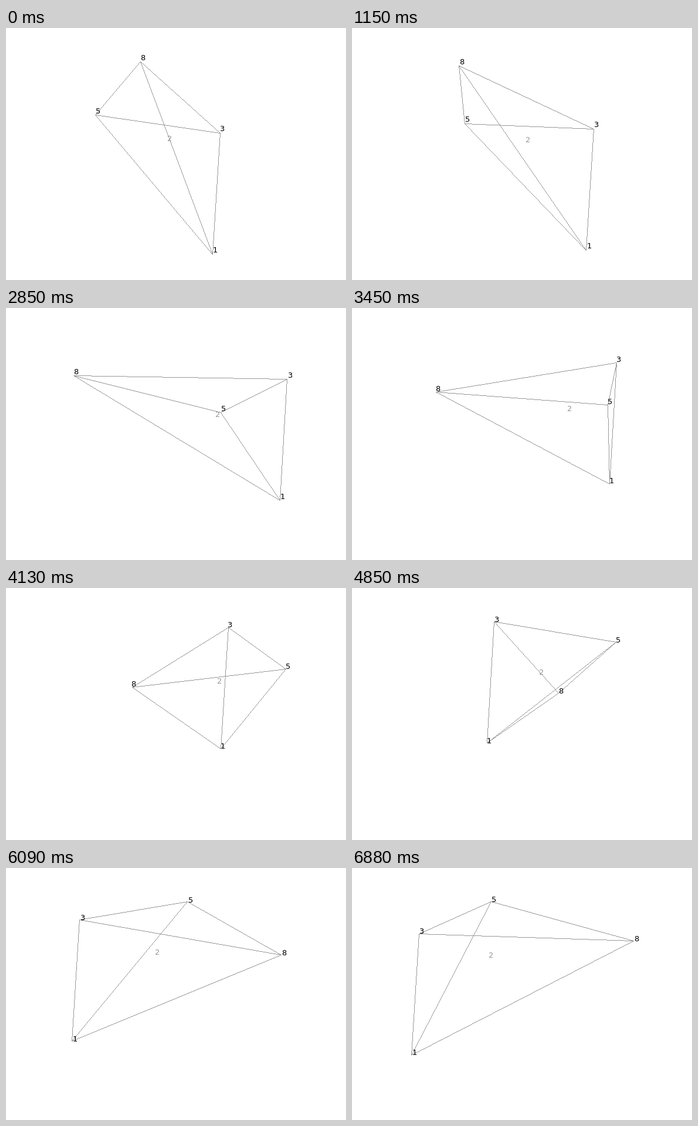
Animation of 580 by 430 pixels, one loop 8000 ms. Source, as an HTML page with a canvas:

```html
<!DOCTYPE html>
<html lang="en">
<head>
<meta charset="utf-8">
<title>Rotating tetrahedron</title>
<style>
  html, body { margin: 0; width: 100%; height: 100%; overflow: hidden; background: #fff; }
  canvas, svg { position: absolute; left: 0; top: 0; width: 580px; height: 430px; }
  text { font: 13px "DejaVu Sans", sans-serif; fill: #000; }
  text.inner { fill: #999; }
</style>
</head>
<body>
<canvas id="wire" width="580" height="430"></canvas>
<svg id="tags" viewBox="0 0 580 430"></svg>
<script>
const LOOP = 8000, START = 500, END = 6880, STEP = 40;
const CENTER = [297.5, 118.5];   // middle of the circle that carries 3, 5 and 8
const RADIUS = 183.4, DEPTH = 61.3, SLANT = 9.6;
const AXIS = [-12.5, 207];       // edge from 3 to 1, parallel to the axis
const FIRST_ANGLE = 68.4;
const APEX_ANGLE = 2 * Math.atan2(3, 4) * 180 / Math.PI;
const EDGES = ["85", "83", "81", "53", "51", "31"];

// the hand-turned motion: time in ms, degrees turned, with one rest
const TURN = [
  [450, 0], [2050, 40.2], [2850, 74.1], [4130, 131.9],
  [5250, 200.2], [5610, 200.2], [6090, 228.4], [6880, 251.3]
];

const pen = document.getElementById("wire").getContext("2d");
pen.fillStyle = "#999";

function addLabel(name, className = "") {
  const el = document.createElementNS("http://www.w3.org/2000/svg", "text");
  el.setAttribute("class", className);
  el.textContent = name;
  return document.getElementById("tags").appendChild(el);
}
const inner = addLabel("2", "inner");
const labels = ["8", "5", "3", "1"].map(name => ({ name, el: addLabel(name) }));

const cos = degrees => Math.cos(degrees * Math.PI / 180);
const sin = degrees => Math.sin(degrees * Math.PI / 180);

function turnAt(time) {
  const i = TURN.findIndex(key => time <= key[0]);
  if (i === 0) return 0;
  const [t0, d0] = TURN[i - 1], [t1, d1] = TURN[i];
  return d0 + (d1 - d0) * (time - t0) / (t1 - t0);
}

function onCircle(angle) {
  return [
    CENTER[0] + RADIUS * cos(angle),
    CENTER[1] + DEPTH * sin(angle) + SLANT * cos(angle)
  ];
}

// one hard pixel per step along the longer side
function drawLine(a, b) {
  const [x0, y0] = a.map(Math.floor), [x1, y1] = b.map(Math.floor);
  const n = Math.max(Math.abs(x1 - x0), Math.abs(y1 - y0), 1);
  for (let i = 0; i <= n; i++) {
    pen.fillRect(Math.round(x0 + (x1 - x0) * i / n), Math.round(y0 + (y1 - y0) * i / n), 1, 1);
  }
}

function place(el, x, y) {
  el.setAttribute("x", Math.round(x));
  el.setAttribute("y", Math.round(y));
}

function draw(time) {
  const stepped = time < START ? 0 : time >= END ? END : Math.floor((time - 10) / STEP) * STEP + 10;
  const angle = FIRST_ANGLE - turnAt(stepped);
  const p3 = onCircle(angle);
  const points = {
    3: p3,
    8: onCircle(angle + 180),
    5: onCircle(angle + APEX_ANGLE),
    1: [p3[0] + AXIS[0], p3[1] + AXIS[1]]
  };

  pen.clearRect(0, 0, 580, 430);
  for (const [a, b] of EDGES) drawLine(points[a], points[b]);

  // labels sway slightly around their corners
  const dx = 0.2 + 1.4 * cos(2 * (angle - 27));
  const dy = -1.2 - 1.9 * cos(angle - 40);
  for (const { name, el } of labels) place(el, points[name][0] + dx, points[name][1] + dy);

  const mean = i => Object.values(points).reduce((sum, p) => sum + p[i], 0) / 4;
  place(inner, mean(0) - 0.3, mean(1));
}

const began = performance.now();
function tick() {
  draw((performance.now() - began) % LOOP);
  requestAnimationFrame(tick);
}
draw(0);
requestAnimationFrame(tick);
</script>
</body>
</html>
```
